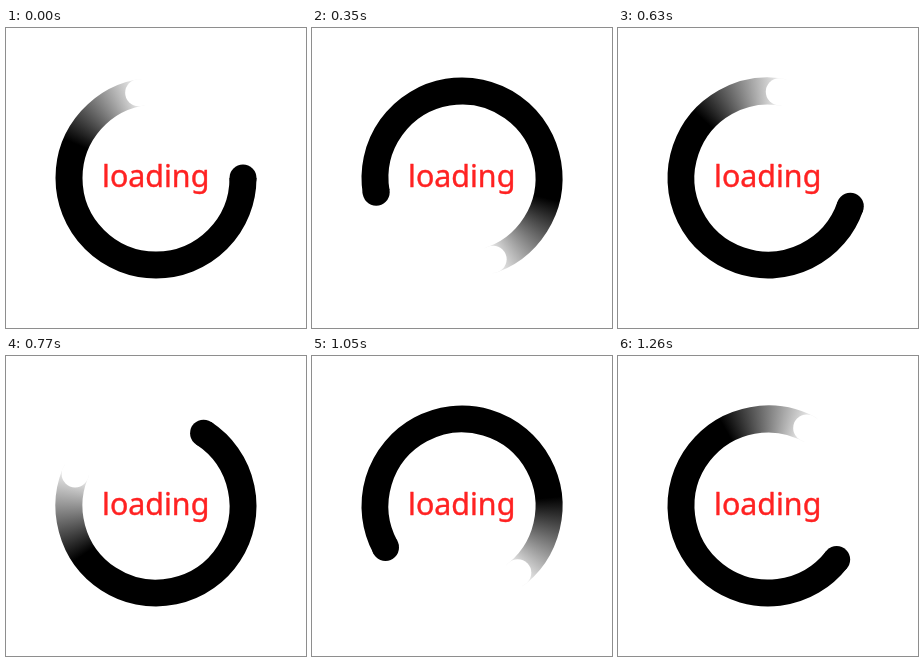
An HTML page with a canvas for the animation above (1.33 s loop, 300 by 300 pixels).

```html
<!DOCTYPE html>
<html lang="en">
<head>
<meta charset="utf-8">
<title>Loading</title>
<style>
  html, body { margin: 0; width: 100%; height: 100%; overflow: hidden; background: #fff; }
  canvas, svg { position: absolute; left: 0; top: 0; width: 300px; height: 300px; }
  text {
    font: 30.4px "Noto Sans", "Open Sans", sans-serif;
    fill: #ff2222; stroke: #ff2222; stroke-width: 0.4; text-anchor: middle;
  }
</style>
</head>
<body>
<canvas id="ring" width="300" height="300"></canvas>
<svg viewBox="0 0 300 300"><text x="149.7" y="159">loading</text></svg>
<script>
  const ctx = document.getElementById('ring').getContext('2d');
  const STEP = 70, STEPS = 19, TURNS = 2;
  const C = 150, R = 87, WIDTH = 27;
  const FADE = 203, CLEAR = 262, NOTCH = 258.5, END = 263.5;
  const LEAD = 20; // keeps the gradient seam clear of the head
  const rad = deg => deg * Math.PI / 180;

  function dot(angle, color) {
    ctx.fillStyle = color;
    ctx.beginPath();
    ctx.arc(C + R * Math.cos(angle), C + R * Math.sin(angle), WIDTH / 2, 0, 2 * Math.PI);
    ctx.fill();
  }

  function draw(ms) {
    const step = Math.floor(ms / STEP) % STEPS;
    const head = rad(-step * 360 * TURNS / STEPS);
    const shade = ctx.createConicGradient(head - rad(LEAD), C, C);
    shade.addColorStop(0, '#000');
    shade.addColorStop((LEAD + FADE) / 360, '#000');
    shade.addColorStop((LEAD + CLEAR) / 360, '#fff');
    shade.addColorStop(1, '#fff');

    ctx.fillStyle = '#fff';
    ctx.fillRect(0, 0, 300, 300);
    ctx.strokeStyle = shade;
    ctx.lineWidth = WIDTH;
    ctx.beginPath();
    ctx.arc(C, C, R, head, head + rad(END));
    ctx.stroke();
    dot(head, '#000');
    dot(head + rad(NOTCH), '#fff');
  }

  const start = performance.now();
  function tick() {
    draw(performance.now() - start);
    requestAnimationFrame(tick);
  }
  tick();
</script>
</body>
</html>
```
